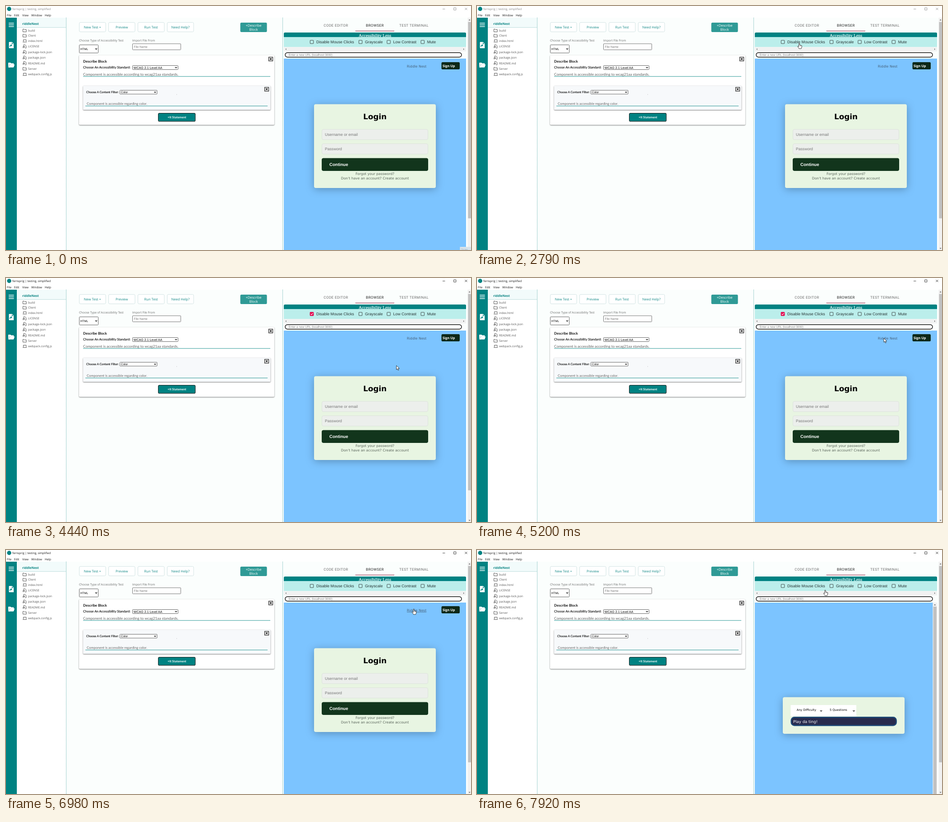
Write an HTML page that moves like this. It is 1031 by 543 pixels and loops after 7990 ms.

```html
<!DOCTYPE html>
<html lang="en">
<head>
<meta charset="utf-8">
<title>Accessibility test</title>
<style>
html, body { margin: 0; width: 100%; height: 100%; overflow: hidden; background: #fff }
svg { display: block; width: 100%; height: 100% }
text { text-rendering: geometricPrecision; white-space: pre }
.open { font-family: "Open Sans", sans-serif }
.lato { font-family: Lato, sans-serif }
.arial { font-family: "Liberation Sans", Arial, sans-serif }
.dejavu { font-family: "DejaVu Sans", Verdana, sans-serif }
.serif { font-family: "Liberation Serif", Times, serif }
.tab { font-family: Roboto, sans-serif; letter-spacing: .45px }
.panel { filter: drop-shadow(.5px 1px 1.2px #0008) }
.card { filter: drop-shadow(0 3px 9px #0004) }
</style>
</head>
<body>
<svg id="stage" viewBox="0 0 1031 543" preserveAspectRatio="none"></svg>
<script>
const LOOP = 7990, TEAL = '#008282', SKY = '#7cc4ff', MINT = '#e8f5e2';

const rect = (x, y, w, h, fill, more = '') =>
  `<rect x="${x}" y="${y}" width="${w}" height="${h}" fill="${fill}" ${more}/>`;
const text = (x, y, size, font, str, fill = '#000', more = '') =>
  `<text x="${x}" y="${y}" font-size="${size}" class="${font}" fill="${fill}" ${more}>${str}</text>`;
const line = (d, color, width = 1, more = '') =>
  `<path d="${d}" fill="none" stroke="${color}" stroke-width="${width}" ${more}/>`;
const shape = (d, fill) => `<path d="${d}" fill="${fill}"/>`;
const group = (id, body, more = '') => `<g id="${id}" ${more}>${body}</g>`;
const MID = 'text-anchor="middle"', BOLD = 'font-weight="700"';
const border = (color, r = 0, w = 1) => `stroke="${color}" stroke-width="${w}" rx="${r}"`;
const chevron = (x, y, color = '#111') => line(`M${x - 2} ${y - 1}l2 2 2-2`, color, 1.2);
const select = (x, y, w, h, label, size, base) =>
  rect(x + .5, y + .5, w - 1, h - 1, '#fff', border('#666', 1)) +
  text(x + 2.7, base, size, 'arial', label) + chevron(x + w - 5, y + h / 2);
const closeBox = (x, y) =>
  rect(x + .5, y + .5, 9, 8.5, '#fff', border('#111', 0, 1.1)) +
  line(`M${x + 2.8} ${y + 2.5}l4.4 4.4m0-4.4l-4.4 4.4`, '#111', 1.3);

function titleBar() {
  const menu = [['File', 2], ['Edit', 18], ['View', 36], ['Window', 56], ['Help', 86]];
  return rect(0, 0, 1031, 26, '#fff') + `<circle cx="7" cy="6.5" r="4.7" fill="${TEAL}"/>` +
    group('title',
      text(14, 9.3, 6.3, 'open', 'fernsprig | testing, simplified', 'currentColor') +
      line('M968 6.8h5.5M992.8 4h5v5h-5zM1017.5 4l5 5m0-5l-5 5', 'currentColor', .8)) +
    menu.map(([s, x]) => text(x, 22.8, 6.4, 'open', s, '#111')).join('');
}

function sidebar() {
  return rect(0, 26, 24, 517, TEAL) +
    line('M6 38.2h11.5M6 42h11.5M6 45.8h11.5', '#fff', 1.4) +
    shape('M7.5 80h6l3.5 3.7v10.3h-9.5q-1 0-1-1v-12q0-1 1-1z', '#fff') +
    shape('M12.8 81v3.5h3.5z', TEAL) +
    line('M8.5 90.5c0-2.5 1.5-3 4-3m-1.8-2l2 2-2 2', TEAL, 1.3) +
    shape('M5 136v-9q0-1 1-1h3.8l1.5 1.6h5q1 0 1 1v1.4h-9.3l-2 6h11l2-5.6h-9l-2 6.6h-1q-2 0-2-1z', '#fff') +
    shape('M8.3 130.2h10.5l-2.2 6.6h-10.4z', '#fff');
}

function fileIcon(kind, y) {
  if (kind === 'dir') return line(`M37.5 ${y - 3}h2.6l1 1.1h4v5h-7.6z`, '#444', .9);
  if (kind === 'page') return line(`M39 ${y - 3.5}h3.5l2 2v5.2h-2M39 ${y - 3.5}v2`, '#444', .9) +
    line(`M38 ${y + 3.5}v-3.6h3v2.2h-1.5`, '#333', 1);
  return line(`M38.5 ${y + 1.7}v-4.2h6.3v4.2M37 ${y + 2.7}h9`, '#444', .9);
}

function fileList() {
  const files = [['build', 'dir', 54.5], ['Client', 'dir', 66], ['index.html', 'screen', 77.5],
    ['LICENSE', 'page', 90], ['package-lock.json', 'page', 102.5], ['package.json', 'page', 115],
    ['README.md', 'page', 127.2], ['Server', 'dir', 139.7], ['webpack.config.js', 'screen', 152]];
  return rect(24, 26, 109, 517, '#fff') + rect(24, 26, 109, 21.5, '#f2fbfb') +
    line('M24 47.8h109', '#a9d5d5', .8) +
    text(36, 42.3, 7, 'open', 'riddleNest', '#0b8583', BOLD) +
    files.map(([s, kind, y]) => fileIcon(kind, y) + text(49, y + 2.3, 6.45, 'open', s, '#555')).join('');
}

function editor() {
  const buttons = [['New Test +', 162], ['Preview', 227], ['Run Test', 292], ['Need Help?', 357]];
  return buttons.map(([s, x]) =>
      rect(x + .5, 36.5, 58.5, 21, '#fff', border('#d3e4e4', 2.5)) +
      text(x + 29.7, 50.2, 7.6, 'open', s, '#168a88', MID)).join('') +
    rect(519.5, 37, 59, 21, '#2f9a96', 'rx="2.5"') +
    text(549, 46.2, 7.5, 'open', '+Describe', '#fff', MID) +
    text(549, 55.2, 7.5, 'open', 'Block', '#fff', MID) +
    text(162, 79.3, 6.53, 'open', 'Choose Type of Accessibility Test', '#666') +
    text(280, 79.3, 6.53, 'open', 'Import File From', '#666') +
    select(162, 86, 43, 19, 'HTML', 6.4, 97.8) +
    rect(280.5, 84, 107, 13.5, '#fff', border('#777', 1)) +
    text(283.5, 93.2, 6.6, 'arial', 'File Name', '#777') +

    rect(162, 109.5, 433, 155, '#fff', 'rx="2" class="panel"') + closeBox(582, 113.3) +
    text(171, 126, 7.9, 'lato', 'Describe Block', '#111', BOLD) +
    text(171, 139.4, 7.1, 'lato', 'Choose An Accessibility Standard:', '#111', 'stroke="#111" stroke-width=".15"') +
    select(280, 132, 102, 10, 'WCAG 2.1 Level AA', 7.1, 139.5) +
    text(171, 155.3, 8.2, 'lato', 'Component is accessible according to wcag21aa standards.', '#606060') +
    line('M171 156.8h415', '#2a9896') +

    rect(171, 177.5, 415.5, 53.5, '#f7f9fb', 'rx="1.5" class="panel"') + closeBox(573, 180.5) +
    text(178, 194, 6.65, 'lato', 'Choose A Content Filter:', '#111', 'stroke="#111" stroke-width=".15"') +
    select(252, 187, 83.5, 9.5, 'Color', 6.5, 194.1) +
    rect(378, 196.5, 1, 1, '#aaa') +
    text(179, 220.3, 7.55, 'lato', 'Component is accessible regarding color.', '#606060') +
    line('M176 222.5h404', '#2a9896') +

    rect(337.7, 238.7, 82, 18, TEAL, border('#1c2d2d', 2.5, 1.2)) +
    text(379, 250.2, 6.8, 'lato', '+It Statement', '#fff', MID + BOLD.padStart(18));
}

function lens() {
  const boxes = [['Disable Mouse Clicks', 678], ['Grayscale', 786], ['Low Contrast', 848.5], ['Mute', 923.7]];
  return text(731.5, 46, 8, 'tab', 'CODE EDITOR', '#6b6b6b', MID) +
    text(818, 46, 8, 'tab', 'BROWSER', '#222', MID) +
    text(904.5, 46, 8, 'tab', 'TEST TERMINAL', '#6b6b6b', MID) +
    rect(774.5, 55, 86.5, 1.2, '#9b3b56') +
    shape('M616 69.5v-8q0-2.5 2.5-2.5h499h-100q2.5 0 2.5 2.5v8z'.replace('h499h-100', 'h399'), TEAL) +
    text(818, 69, 9.7, 'serif', 'Accessibility Lens', '#fff', MID + ' stroke="#fff" stroke-width=".2"') +
    rect(616, 69.3, 404, 22, '#bbeeeb') +
    boxes.map(([s, x]) => rect(x - 3.7, 76.3, 7.4, 7.4, 'none', border('#454f4f', .7)) +
      text(x + 10, 82.8, 8.75, 'arial', s, '#263333')).join('') +
    group('tick', rect(673.8, 75.8, 8.4, 8.4, '#e6064f', 'rx="1"') +
      line('M675.7 80l1.7 1.8 3.2-3.5', '#fff', 1.1)) +
    rect(616, 91.5, 404, 9.5, '#f1f2f2') +
    shape('M621.5 94.3v3.6l-2-1.8zM1014 94.3v3.6l2-1.8z', '#666') +
    rect(619, 103.7, 391, 10, '#fff', border('#111', 5, 1.4)) +
    text(626.5, 111, 6.5, 'arial', 'Enter a new URL (localhost:3000)', '#777') +
    rect(1023.5, 26, 7.5, 517, '#f1f1f1') + rect(1024.5, 35.5, 6.5, 437, '#c1c1c1') +
    shape('M1025.7 32h4l-2-2.3zM1025.7 538.5h4l-2 2.3z', '#555');
}

function loginPage() {
  const field = (y, s) => rect(700.5, y + .5, 235, 23, '#ecefec', border('#dde3dc', 3.5)) +
    text(707, y + 15, 8.65, 'arial', s, '#757575');
  return text(910.5, 136.8, 7.6, 'dejavu', 'Riddle Nest', '#47627a', MID + ' id="link"') +
    rect(965.5, 125, 40.5, 16, '#0d2818', 'rx="2.5"') +
    text(968, 136, 7.4, 'open', 'Sign Up', '#fff', BOLD) +
    rect(683, 218.5, 270, 186.5, MINT, 'rx="4" class="card"') +
    text(818, 252.3, 16.8, 'dejavu', 'Login', '#000', MID + ' ' + BOLD) +
    field(274, 'Username or email') + field(306, 'Password') +
    rect(700, 338.5, 236, 28.5, '#12351c', 'rx="4"') +
    text(717, 356.2, 9.6, 'arial', 'Continue', '#fff', BOLD) +
    text(818, 376.3, 7.6, 'dejavu', 'Forgot your password?', '#59645a', MID) +
    text(818, 386.3, 7.6, 'dejavu', 'Don\'t have an account? Create account', '#59645a', MID);
}

function playPage() {
  return rect(678, 327.5, 270, 81.5, MINT, 'rx="4" class="card"') +
    rect(695.5, 345, 145.5, 25, '#fff') +
    text(708.7, 357.7, 6.5, 'dejavu', 'Any Difficulty') + chevron(763, 358) +
    text(782, 357.7, 6.5, 'dejavu', '5 Questions') + chevron(835.5, 358) +
    rect(696.7, 372.2, 233, 18.3, '#282b4d', border('#1d4a78', 7, 2.4)) +
    text(701, 384.7, 8.6, 'dejavu', 'Play da ting!', '#fff') +
    rect(1010.5, 117, 9.5, 426, '#f1f1f1') + rect(1011.7, 126, 7.3, 417, '#c1c1c1') +
    shape('M1013.2 123h4l-2-2.3z', '#555');
}

const stage = document.getElementById('stage');
stage.innerHTML = rect(0, 0, 1031, 543, '#fbfefd') + titleBar() + sidebar() + fileList() + editor() +
  line('M133.5 26v517M613.5 26v517', '#3b9c9a', .9, 'stroke-dasharray="1 1"') + lens() +
  rect(616, 117, 404, 426, SKY) + group('login', loginPage()) + group('play', playPage()) +
  group('tip', rect(1006.5, 536, 24.5, 8, '#d9e3ea') + text(1009, 543.5, 6, 'open', 'Draw', '#8fa9bd')) +
  group('arrow', `<path d="M0 0v9l2.1-1.9 1.5 3.4 1.6-.7-1.5-3.3 2.9-.2z" fill="#fff" stroke="#111" stroke-width=".8"/>`) +
  group('hand', `<path d="M-1 .8q1-1.4 2 0v3.7l4 .9q1 .3.9 1.4l-.7 3.6-.8 2h-4.9l-1-1.8-2.3-3.2q.6-1.5 1.9-.3l.9.9z" fill="#fff" stroke="#111" stroke-width=".8"/>` +
    line('M2.2 5v2.2M3.9 5.4v2', '#333', .5));

// Pointer path: time, x, y
const path = [[470, 1028, 541], [1030, 780, 260], [1240, 703, 136], [1310, 703, 136], [1650, 714, 78],
  [2380, 714, 78], [2790, 714.5, 82.5], [2990, 714.5, 84], [3130, 717, 101], [3200, 717, 101],
  [3680, 773, 367], [3820, 769, 356], [4030, 769, 355], [4600, 903, 133], [4790, 901, 134],
  [5200, 902, 134], [5300, 901, 133], [5620, 817, 107], [5690, 817, 107], [6050, 677, 80],
  [6250, 677, 80], [6430, 680, 102], [6500, 682, 103], [6900, 904, 131], [7640, 904, 131], [7920, 772, 89]];

function pointer(t) {
  const i = path.findIndex(k => k[0] > t);
  if (i < 1) return path[i < 0 ? path.length - 1 : 0].slice(1);
  const [t0, x0, y0] = path[i - 1], [t1, x1, y1] = path[i], p = (t - t0) / (t1 - t0);
  return [x0 + (x1 - x0) * p, y0 + (y1 - y0) * p];
}

const el = id => document.getElementById(id);
const show = (id, on) => el(id).style.display = on ? '' : 'none';

function draw(t) {
  const [x, y] = pointer(t);
  const blocked = t >= 2950 && t < 6230, opened = t >= 7040;
  const onLink = !blocked && !opened && x > 887 && x < 934 && y > 126 && y < 140;
  const hand = onLink || (y > 70 && y < 98);
  el('title').style.color = t < 2860 ? '#858585' : '#111';
  el('tip').style.opacity = Math.max(0, Math.min(1, (140 - t) / 70));
  show('tick', blocked);
  show('login', !opened);
  show('play', opened);
  el('link').style.textDecoration = onLink ? 'underline' : 'none';
  show('arrow', t >= 470 && !hand);
  show('hand', t >= 470 && hand);
  for (const id of ['arrow', 'hand']) el(id).setAttribute('transform', `translate(${x} ${y})`);
}

const start = performance.now();
function tick() {
  draw((performance.now() - start) % LOOP);
  requestAnimationFrame(tick);
}
tick();
</script>
</body>
</html>
```
